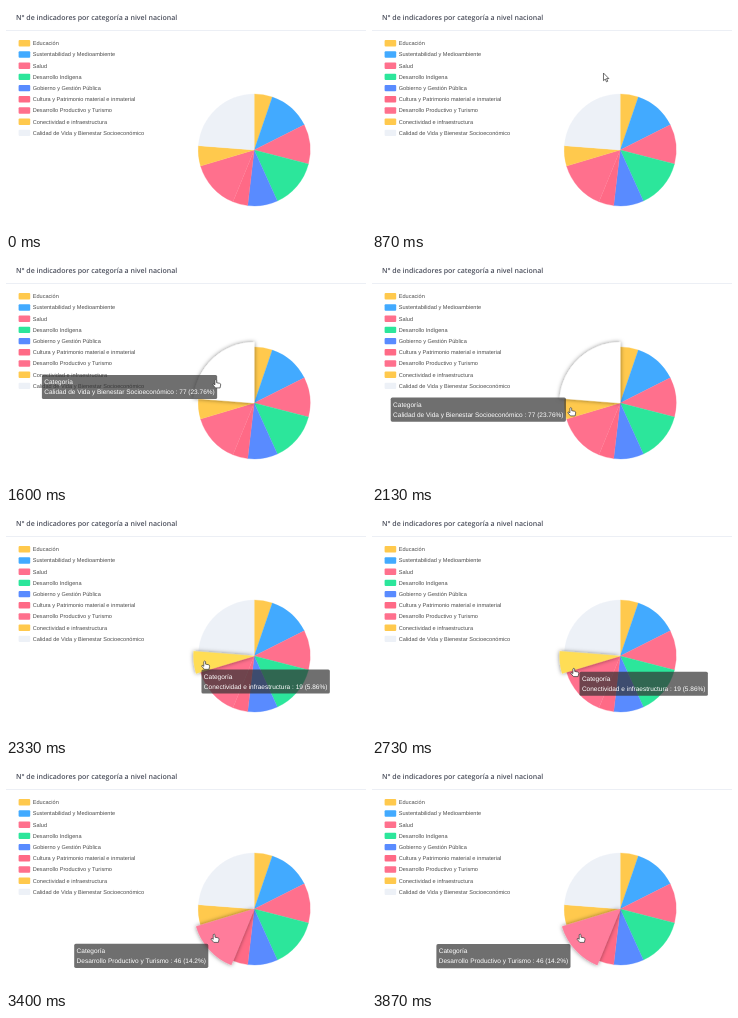
An HTML page that plays this animation: 360x225 px, repeating every 3940 ms.

```html
<!DOCTYPE html>
<html lang="es">
<head>
<meta charset="utf-8">
<title>Indicadores por categoría</title>
<style>
  html, body { margin: 0; width: 100%; height: 100%; overflow: hidden; background: #fff; }
  svg { display: block; width: 100%; height: 100%; }
  text { text-rendering: geometricPrecision; }
  .title { font: 600 7.02px "Open Sans", sans-serif; fill: #4b4f5c; }
  .legend { font: 5.6px "Liberation Sans", Arial, sans-serif; fill: #4c4c4c; }
  .tip { font: 6.5px "Liberation Sans", Arial, sans-serif; fill: #fff; }
</style>
</head>
<body>
<svg id="stage" viewBox="0 0 360 225">
  <defs>
    <filter id="shadow" x="-50%" y="-50%" width="200%" height="200%">
      <feDropShadow dx="0" dy="0" stdDeviation="2.1" flood-color="#000" flood-opacity=".5"/>
    </filter>
  </defs>
  <text class="title" x="10" y="14.3">N° de indicadores por categoría a nivel nacional</text>
  <rect y="24" width="360" height=".6" fill="#dfe4ee"/>
  <g id="legend"></g>
  <g id="pie"></g>
  <g id="tip">
    <rect height="24.1" rx="1.6" fill="#323232" fill-opacity=".7"/>
    <text class="tip" x="2.4" y="9.3">Categoría</text>
    <text class="tip" x="2.4" y="19"></text>
  </g>
  <g id="cursor" fill="#fff" stroke="#333" stroke-width=".7" stroke-linejoin="round">
    <path id="arrow" d="M0 0V7.6L1.8 6L3 8.8L4.3 8.2L3.1 5.5H5.4Z"/>
    <path id="hand" d="M-.6 -.1Q.4 -1.4 1.2 -.1V2.4L4.2 3Q5.4 3.3 5.2 4.6L4.6 7.6H0L-2.6 4.6Q-2.8 3.4 -1.6 3.7L-.6 4.6Z"/>
  </g>
</svg>
<script>
const LOOP = 3940, STEP = 200 / 3, FRAMES = 59;
const CX = 248.2, CY = 144, RADIUS = 56, LIFT = 4.63, GAP = 9.3, PAD = 2.4;

const [yellow, blue, pink, green, indigo, rose, pale] =
  ['#ffc94d', '#42aaff', '#ff708d', '#2ce69b', '#598bff', '#ff6a86', '#edf1f7'];
const bright = { [yellow]: '#ffdd55', [pink]: '#ff7b9b', [pale]: '#ffffff' };

const slices = [
  ['Educación', 17, yellow],
  ['Sustentabilidad y Medioambiente', 40, blue],
  ['Salud', 37, pink],
  ['Desarrollo Indígena', 46, green],
  ['Gobierno y Gestión Pública', 28, indigo],
  ['Cultura y Patrimonio material e inmaterial', 14, rose],
  ['Desarrollo Productivo y Turismo', 46, pink, '14.2'],
  ['Conectividad e infraestructura', 19, yellow, '5.86'],
  ['Calidad de Vida y Bienestar Socioeconómico', 77, pale, '23.76']
].map(([name, value, color, percent]) => ({ name, value, color, percent }));

// Pointer path: time, x, y
const path = [
  [460, 243, -9], [533, 242, 10], [867, 231.5, 67], [1067, 224, 84], [1200, 223, 96],
  [1533, 220.2, 108], [1600, 209.5, 121.3], [2067, 202.6, 130], [2133, 198.5, 149.3],
  [2667, 198.2, 150.5], [2733, 201.5, 157], [3067, 201.5, 157.4], [3133, 207.8, 169.8]
];

const $ = id => document.getElementById(id);
function add(parent, tag, attrs, text = '') {
  const node = document.createElementNS('http://www.w3.org/2000/svg', tag);
  set(node, attrs);
  node.textContent = text;
  return parent.appendChild(node);
}
function set(node, attrs) {
  for (const key in attrs) node.setAttribute(key, attrs[key]);
}
const show = (node, on) => set(node, { visibility: on ? 'visible' : 'hidden' });
const place = (node, [x, y]) => set(node, { transform: `translate(${x} ${y})` });

const total = slices.reduce((sum, s) => sum + s.value, 0);
const [tipBox, , tipText] = $('tip').children;
let angle = 0;
slices.forEach((s, i) => {
  s.from = angle;
  s.to = angle += s.value / total * 2 * Math.PI;
  const y = 37.3 + 11.2 * i;
  add($('legend'), 'rect', { x: 12.6, y: y - 3.2, width: 11.6, height: 6.4, rx: 1, fill: s.color });
  add($('legend'), 'text', { class: 'legend', x: 26.7, y: y + 1.9 }, s.name);
  s.node = add($('pie'), 'path', { 'stroke-width': .3 });
  s.label = `${s.name} : ${s.value} (${s.percent}%)`;
  tipText.textContent = s.label;
  s.tipWidth = tipText.getComputedTextLength() + 2 * PAD;
});

function wedge({ from, to }, r) {
  const point = a => `${CX + r * Math.sin(a)} ${CY - r * Math.cos(a)}`;
  return `M${CX} ${CY}L${point(from)}A${r} ${r} 0 0 1 ${point(to)}Z`;
}

function pointer(time) {
  if (time < path[0][0]) return null;
  const next = path.findIndex(p => p[0] > time);
  if (next < 0) return path.at(-1).slice(1);
  const [t0, x0, y0] = path[next - 1], [t1, x1, y1] = path[next];
  const k = (time - t0) / (t1 - t0);
  return [x0 + (x1 - x0) * k, y0 + (y1 - y0) * k];
}

function sliceAt(point) {
  if (!point) return null;
  const dx = point[0] - CX, dy = point[1] - CY;
  if (Math.hypot(dx, dy) > RADIUS) return null;
  const a = (Math.atan2(dx, -dy) + 2 * Math.PI) % (2 * Math.PI);
  return slices.find(s => a < s.to) || null;
}

function tipTarget([x, y], { tipWidth }) {
  const fits = x + GAP + tipWidth < 345;
  return [fits ? x + GAP : x - GAP - tipWidth, y + GAP];
}

// The chart reacts one step behind the pointer; the tooltip eases after it.
const chase = 1 - (1 - STEP / 400) ** 5;
const states = [];
let active = null, previous = null, since = 0, tip = null;
for (let i = 0; i < FRAMES; i++) {
  const seen = pointer((i - 1) * STEP + 1), hover = sliceAt(seen);
  if (hover !== active) [previous, active, since] = [active, hover, i];
  if (hover) {
    const goal = tipTarget(seen, hover);
    tip = tip ? tip.map((v, j) => v + (goal[j] - v) * chase) : goal;
  }
  const cursor = pointer(i * STEP + 1);
  states.push({ cursor, hand: !!sliceAt(cursor), active, previous, tip, age: (i - since) * STEP + 30 });
}

function elasticOut(k) {
  return k >= 1 ? 1 : 1 + 2 ** (-10 * k) * Math.sin((k - .1) * 2 * Math.PI / .4);
}

let drawn = -1;
function draw(index) {
  if (index === drawn) return;
  drawn = index;
  const { cursor, hand, active, previous, tip, age } = states[index];
  const lift = LIFT * elasticOut(age / 300);
  for (const s of slices) {
    const on = s === active;
    const r = RADIUS + (on ? lift : s === previous ? LIFT - lift : 0);
    const fill = on ? bright[s.color] : s.color;
    set(s.node, { d: wedge(s, r), fill, stroke: fill, filter: on ? 'url(#shadow)' : 'none' });
  }
  // Keep the lifted slice above its neighbours.
  slices.forEach(s => s !== active && $('pie').append(s.node));
  if (active) $('pie').append(active.node);

  show($('tip'), active);
  if (active) {
    place($('tip'), tip);
    set(tipBox, { width: active.tipWidth });
    tipText.textContent = active.label;
  }
  show($('arrow'), cursor && !hand);
  show($('hand'), cursor && hand);
  if (cursor) place($('cursor'), cursor);
}

const startOf = index => Math.round(index * STEP / 10) * 10;
function tick() {
  const time = performance.now() % LOOP;
  let index = Math.min(FRAMES - 1, Math.floor((time + 3.4) / STEP));
  if (startOf(index) > time) index--;
  draw(index);
  requestAnimationFrame(tick);
}
tick();
</script>
</body>
</html>
```
